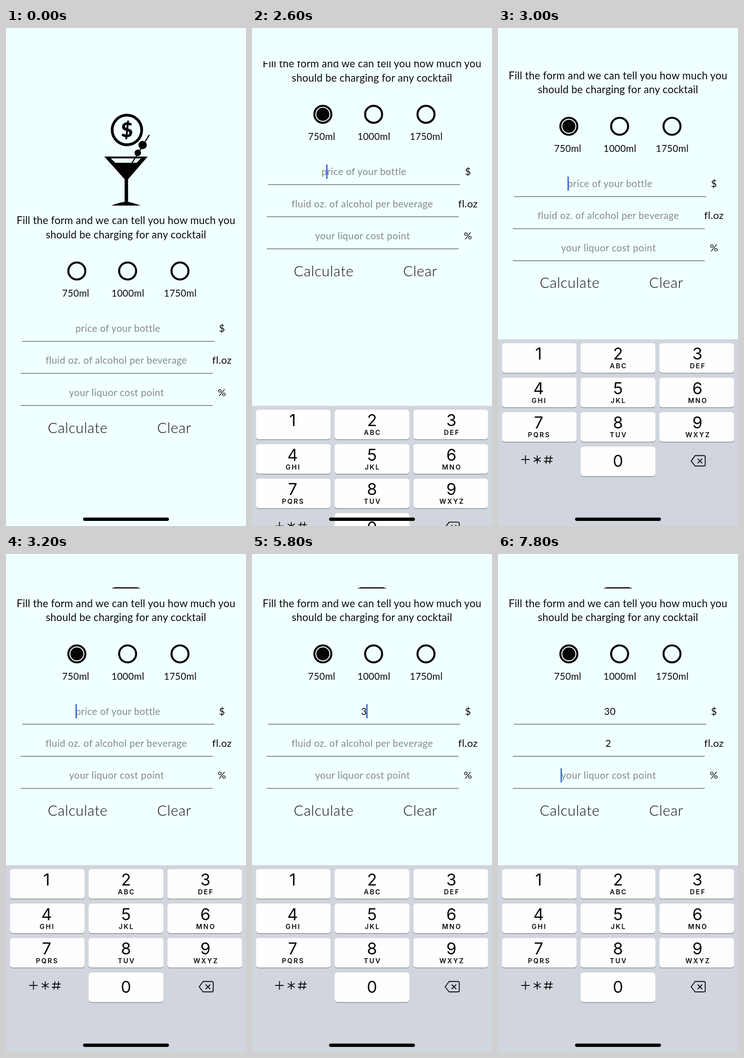
Recreate the animation shown at these times as an HTML page. Size 520 by 1077 pixels, loop 8000 ms.

```html
<!DOCTYPE html>
<html lang="en">
<head>
<meta charset="utf-8">
<title>Cocktail price calculator</title>
<style>
  html, body { margin: 0; width: 100%; height: 100%; overflow: hidden; background: #f0ffff; }
  svg { display: block; width: 100%; height: 100%; }
  text { text-anchor: middle; font-family: Lato, sans-serif; fill: #0b0b0b; }
  .intro { font-size: 22.5px; letter-spacing: .2px; }
  .size { font-size: 20.5px; letter-spacing: .3px; }
  .field { font-size: 21px; letter-spacing: .43px; }
  .unit { font-size: 22px; letter-spacing: .4px; }
  .button { font-size: 31px; font-weight: 300; letter-spacing: .8px; }
  .ring { fill: none; stroke: #050505; stroke-width: 4.4; }
  .digit { font: 400 35.5px Inter, sans-serif; }
  .letters { font: 600 14.5px Inter, sans-serif; letter-spacing: 2.4px; }
  .thin { fill: none; stroke: #0b0b0b; stroke-width: 1.9; stroke-linecap: round; stroke-linejoin: round; }
</style>
</head>
<body>
<svg viewBox="0 0 520 1077">
  <clipPath id="page"><rect y="72" width="520" height="1005"/></clipPath>
  <rect width="520" height="1077" fill="#f0ffff"/>
  <g clip-path="url(#page)">
    <g id="content">
      <circle cx="262" cy="220.500" r="32" fill="none" stroke="#000" stroke-width="6"/>
      <text x="262" y="235.500" font-size="44" font-weight="900">$</text>
      <path d="M213 278H307L264.500 327V376Q272 377 292 384H228Q248 377 257 376V327Z"/>
      <path d="M227 282H292L283 291.500H237Z" fill="#f0ffff"/>
      <path d="M310 232L273 292" stroke="#000" stroke-width="2.400" stroke-linecap="round"/>
      <circle cx="296" cy="253" r="9"/>
      <circle cx="285.500" cy="270" r="7"/>
      <text class="intro" x="260" y="424">Fill the form and we can tell you how much you</text>
      <text class="intro" x="260" y="454.500">should be charging for any cocktail</text>
      <circle id="dot" cx="153.500" cy="525.500" r="0" fill="#050505"/>
      <text class="button" x="155.500" y="875.500">Calculate</text>
      <text class="button" x="364.500" y="875.500">Clear</text>
      <rect id="caret" y="634" width="3" height="31" rx="1" fill="#3d68e4"/>
    </g>
  </g>
  <g id="keyboard">
    <rect y="673" width="520" height="404" fill="#d1d5dd"/>
    <path class="thin" d="M51 933H68M59.500 924.500V941.500M85 925V941M78 929L92 937M92 929L78 937
      M106 925L104 941M114 925L112 941M101 930H118M100 937H117"/>
    <path class="thin" d="M427 924.500H446Q449 924.500 449 927.500V944Q449 947 446 947H427L418.500 936Z
      M433 931.500L442 940.500M442 931.500L433 940.500"/>
  </g>
  <rect x="167" y="1058.700" width="186" height="7.200" rx="3.600"/>
</svg>
<script>
const LOOP = 8;
const $ = id => document.getElementById(id);

function add(parent, tag, attributes, text = '') {
  const node = document.createElementNS('http://www.w3.org/2000/svg', tag);
  for (const name in attributes) node.setAttribute(name, attributes[name]);
  node.textContent = text;
  parent.append(node);
  return node;
}

const content = $('content'), keyboard = $('keyboard'), caret = $('caret');

[[153.5, 151, '750ml'], [263.5, 264, '1000ml'], [377, 377.5, '1750ml']].forEach(([cx, x, label]) => {
  add(content, 'circle', { class: 'ring', cx, cy: 525.5, r: 18.4 });
  add(content, 'text', { class: 'size', x, y: 581 }, label);
});

// left: caret position in front of the placeholder
const fields = [
  { hint: 'price of your bottle', unit: '$', x: 242.5, left: 152, line: 35, focus: 2.48 },
  { hint: 'fluid oz. of alcohol per beverage', unit: 'fl.oz', x: 239, left: 85, line: 32, focus: 6.5 },
  { hint: 'your liquor cost point', unit: '%', x: 239.5, left: 137, line: 32, focus: 7.6 }
];
fields.forEach((field, i) => {
  field.y = 69.4 * i;
  field.text = add(content, 'text', { class: 'field', x: field.x, y: 657 + field.y });
  add(content, 'text', { class: 'unit', x: 468, y: 657 + field.y }, field.unit);
  add(content, 'rect', { x: field.line, y: 677 + field.y, width: 416, height: 1.2, fill: '#454a4b' });
});
content.append(caret);

const keys = {};
['', 'ABC', 'DEF', 'GHI', 'JKL', 'MNO', 'PQRS', 'TUV', 'WXYZ', ''].forEach((letters, i) => {
  const digit = (i + 1) % 10;
  const column = digit ? i % 3 : 1, row = Math.floor(i / 3);
  const x = 8.5 + 170.5 * column, y = 681.5 + 74.5 * row;
  const middle = 88 + 172 * column;
  add(keyboard, 'rect', { x, y: y + 1.5, width: 162, height: 64, rx: 6, fill: '#8b8e94' });
  keys[digit] = add(keyboard, 'rect', { x, y, width: 162, height: 64, rx: 6 });
  add(keyboard, 'text', { class: 'digit', x: middle, y: y + (digit ? 35.5 : 44) }, digit);
  add(keyboard, 'text', { class: 'letters', x: middle + 1.2, y: y + 54.5 }, letters);
});

const strokes = [
  { time: 5.6, digit: 3, field: 0 },
  { time: 5.95, digit: 0, field: 0 },
  { time: 6.9, digit: 2, field: 1 }
];
const TYPE_DELAY = 0.08;

const clamp = v => Math.min(1, Math.max(0, v));

// Progress of a spring; damping below 1 swings past the end.
function spring(t, omega, damping) {
  if (t <= 0) return 0;
  const decay = Math.exp(-damping * omega * t);
  if (damping === 1) return 1 - decay * (1 + omega * t);
  const root = Math.sqrt(1 - damping * damping), angle = omega * root * t;
  return 1 - decay * (Math.cos(angle) + damping / root * Math.sin(angle));
}

function scrollAt(t) {
  const rise = clamp((t - 2.477) / 0.12);
  const overshoot = 29.5 * Math.exp(-5.3 * Math.max(0, t - 2.6));
  return rise * rise * (3 - 2 * rise) * (309.5 + (t < 3.15 ? overshoot : 0));
}

function caretOpacity(t) {
  if (t < 2.48) return 0;
  if (t < 4.1) return 1 - clamp((t - 3.55) / 0.1);
  if (t < 4.5) return clamp((t - 4.05) / 0.1);
  if (t < 5.6) return clamp((t - 5.05) / 0.1);
  return 1;
}

function pressAt(t, digit) {
  const stroke = strokes.find(s => s.digit === digit);
  if (!stroke || t < stroke.time) return 0;
  return 1 - clamp((t - stroke.time - 0.08) / 0.1);
}

function render(t) {
  content.setAttribute('transform', `translate(0 ${-scrollAt(t)})`);
  keyboard.setAttribute('transform', `translate(0 ${404 * (1 - spring(t - 2.481, 18.26, 1))})`);
  $('dot').setAttribute('r', 14.1 * spring(t - 1.49, 22, 0.33));

  fields.forEach((field, i) => {
    field.value = strokes.filter(s => s.field === i && t >= s.time + TYPE_DELAY).map(s => s.digit).join('');
    field.text.textContent = field.value || field.hint;
    field.text.style.fill = field.value ? '#0b0b0b' : '#858a8c';
  });

  const active = fields.filter(field => t >= field.focus).pop() || fields[0];
  const slide = active === fields[0] ? 90 * Math.exp(-18 * Math.max(0, t - 2.48)) : 0;
  const x = active.value ? active.x + 6.5 * active.value.length : active.left + slide;
  caret.setAttribute('x', x - 1.5);
  caret.setAttribute('y', 634 + active.y);
  caret.setAttribute('opacity', caretOpacity(t));

  for (const digit in keys) {
    const press = pressAt(t, Number(digit));
    keys[digit].setAttribute('fill', `rgb(${254 - 76 * press} ${254 - 71 * press} ${255 - 62 * press})`);
  }
}

function frame() {
  render(performance.now() / 1000 % LOOP);
  requestAnimationFrame(frame);
}
frame();
</script>
</body>
</html>
```
